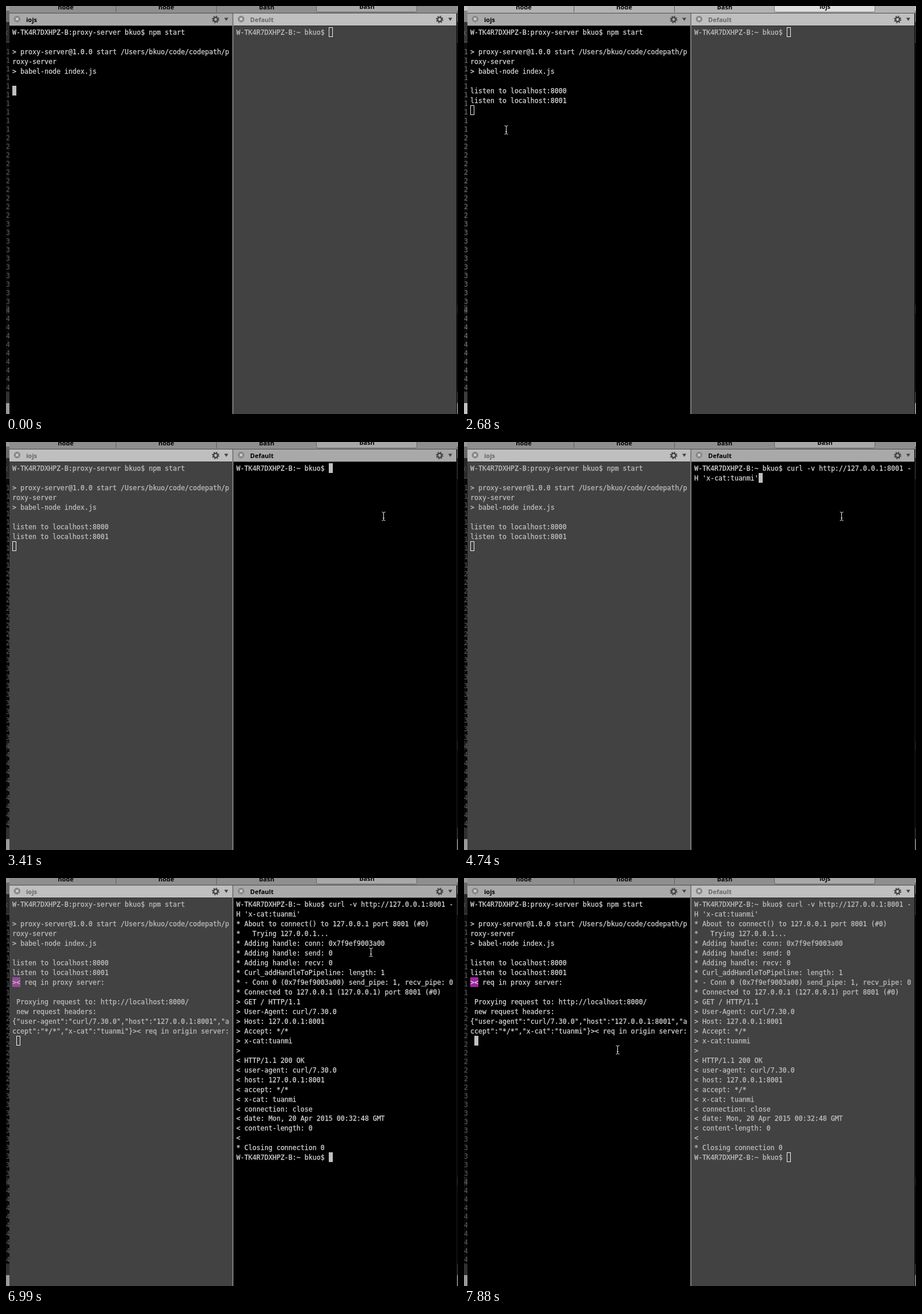
These frames come from a looping animation (787 by 711 pixels, 8000 ms). An HTML page:

```html
<!DOCTYPE html>
<html lang="en">
<head>
<meta charset="utf-8">
<title>Proxy server terminal</title>
<style>
html, body { margin: 0; width: 100%; height: 100%; overflow: hidden; background: #111; }
svg { display: block; width: 787px; height: 711px; }
text { white-space: pre; }
.gutter { font: 11.6px "DejaVu Sans Mono", monospace; fill: #888; }
.label { font: bold 11px "Open Sans", sans-serif; }
.mid { text-anchor: middle; }

.shade { opacity: .3; }
.tabs { fill: #8e8e8e; }
.front { fill: #a8a8a8; stroke: #606060; }
.away .shade { opacity: .12; }
.away .tabs { fill: #b2b2b2; }
.away .front { fill: #dedede; stroke: #777; }

.bar { fill: #bfbfbf; }
.body { fill: #424242; }
.pane .label { fill: #666; }
.term { font: 11.628px "DejaVu Sans Mono", monospace; fill: #c0c0c0; stroke: #c0c0c0; stroke-width: .25; }
.mark { fill: #964a97; stroke: none; }
.block { fill: none; stroke: #f2f2f2; stroke-width: 1; }
.on .bar { fill: #a9a9a9; }
.on .body { fill: #000; }
.on .label { fill: #000; }
.on .term { fill: #d8d8d8; stroke: #d8d8d8; }
.on .mark { fill: #a0229f; }
svg:not(.away) .on .block { fill: #c0c0c0; stroke: #c0c0c0; }
</style>
</head>
<body>
<svg id="stage" viewBox="0 0 787 711">
  <defs>
    <g id="close">
      <circle r="5.7" fill="#858585"/>
      <path d="M-2.2-2.2 2.2 2.2M2.2-2.2-2.2 2.2" stroke="#dcdcdc" stroke-width="1.6"/>
    </g>
    <g id="gear" fill="none" stroke="#444">
      <circle r="3.6" stroke-width="2.4"/>
      <circle r="5.4" stroke-width="2.2" stroke-dasharray="2.1 2.141"/>
    </g>
    <path id="ibeam" fill="none" d="M-3-7.5Q0-7.5 0-5.5Q0-7.5 3-7.5M0-6V6M-3 7.5Q0 7.5 0 5.5Q0 7.5 3 7.5M-1.5 3H1.5"/>
  </defs>

  <g id="backdrop">
    <rect width="787" height="711" fill="#0d0d0d"/>
    <rect width="787" height="8" fill="#dcdcdc"/>
    <rect y="8" width="787" height="20" fill="#999"/>
    <rect y="28" width="787" height="34" fill="#3c3c3c"/>
    <path d="M3 43 0 47 3 51" fill="none" stroke="#888"/>
    <rect y="62" width="787" height="2" fill="#555"/>
    <rect y="521" width="787" height="15" fill="#2a2a24"/>
    <rect y="672" width="787" height="20" fill="#444"/>
    <rect y="692" width="787" height="19" fill="#dcdcdc"/>
  </g>
  <rect class="shade" width="787" height="711"/>

  <rect class="tabs" x="6" width="779" height="12"/>
  <path d="M191.5 0V11M366.5 0V11" stroke="#606060"/>
  <rect x="6" y="12" width="779" height="1" fill="#4c4c4c"/>
  <rect class="front" x="540.5" y="-8" width="175" height="18.5" rx="3"/>
  <g class="label mid">
    <text x="104" y="6">node</text>
    <text x="279" y="6">node</text>
    <text x="454" y="6">bash</text>
    <text x="628.5" y="5" id="tab"></text>
  </g>

  <g id="left" class="pane"></g>
  <g id="right" class="pane"></g>
  <rect x="394" y="13" width="2" height="698" fill="#7c7c7c"/>
  <rect x="784" y="13" width="1.5" height="698" fill="#111"/>

  <g id="pointer">
    <g id="beam">
      <use href="#ibeam" stroke="#000" stroke-width="2.4" opacity=".3"/>
      <use href="#ibeam" stroke="#f0f0f0"/>
    </g>
    <path id="arrow" d="M-1-1V11L2 8.4 4 13 6 12 4 8H8Z" fill="#000" stroke="#fff" stroke-width=".9"/>
  </g>
</svg>
<script>
const LOOP = 8000, CELL = 7, ROW = 16.977;
const byId = id => document.getElementById(id);
const rowTop = row => Math.round(row * ROW);
const stage = byId('stage');

function add(parent, tag, attrs, content = '') {
  const el = document.createElementNS('http://www.w3.org/2000/svg', tag);
  for (const key in attrs) el.setAttribute(key, attrs[key]);
  el.textContent = content;
  parent.appendChild(el);
  return el;
}

// Line numbers of the editor behind the window.
for (let n = 10; n < 50; n++)
  add(byId('backdrop'), 'text', { class: 'gutter', x: 0, y: 84 + 15 * (n - 10) }, n);

const host = 'W-TK4R7DXHPZ-B', user = 'bkuo', cat = 'tuanmi';
const prompt = `${host}:~ ${user}$ `;

// Each phase adds lines from a given row and column, then leaves the cursor at [row, col].
const leftPhases = [
  { row: 0, cursor: [6, 0], lines: `${host}:proxy-server ${user}$ npm start

> proxy-server@1.0.0 start /Users/${user}/code/codepath/p
roxy-server
> babel-node index.js` },
  { row: 6, cursor: [8, 0], lines: `listen to localhost:8000
listen to localhost:8001` },
  { row: 8, cursor: [14, 1], mark: true, lines: `>< req in proxy server:

 Proxying request to: http://localhost:8000/
 new request headers:
{"user-agent":"curl/7.30.0","host":"127.0.0.1:8001","a
ccept":"*/*","x-cat":"${cat}"}>< req in origin server:` }
];

const rightPhases = [
  { row: 0, cursor: [0, 23], lines: prompt },
  { row: 0, col: 23, cursor: [1, 16], lines: `curl -v http://127.0.0.1:8001 -
H 'x-cat:${cat}'` },
  { row: 2, cursor: [26, 23], lines: `* About to connect() to 127.0.0.1 port 8001 (#0)
*   Trying 127.0.0.1...
* Adding handle: conn: 0x7f9ef9003a00
* Adding handle: send: 0
* Adding handle: recv: 0
* Curl_addHandleToPipeline: length: 1
* - Conn 0 (0x7f9ef9003a00) send_pipe: 1, recv_pipe: 0
* Connected to 127.0.0.1 (127.0.0.1) port 8001 (#0)
> GET / HTTP/1.1
> User-Agent: curl/7.30.0
> Host: 127.0.0.1:8001
> Accept: */*
> x-cat:${cat}
>
< HTTP/1.1 200 OK
< user-agent: curl/7.30.0
< host: 127.0.0.1:8001
< accept: */*
< x-cat: ${cat}
< connection: close
< date: Mon, 20 Apr 2015 00:32:48 GMT
< content-length: 0
<
* Closing connection 0
${prompt}` }
];

function makePane(id, x, title, phases) {
  const pane = byId(id);
  pane.setAttribute('transform', `translate(${x} 0)`);
  add(pane, 'rect', { class: 'body', y: 34, width: 388, height: 677 });
  add(pane, 'rect', { class: 'bar', y: 13, width: 388, height: 21 });
  add(pane, 'rect', { y: 34, width: 388, height: 1, fill: '#333' });
  add(pane, 'use', { href: '#close', x: 13.3, y: 22.7 });
  add(pane, 'text', { class: 'label', x: 29, y: 27.5 }, title);
  add(pane, 'use', { href: '#gear', x: 359, y: 23.5 });
  add(pane, 'path', { d: 'M374 20.5h7l-3.5 5.5z', fill: '#444' });

  const term = add(pane, 'g', { class: 'term', transform: 'translate(5 37)' });
  const groups = phases.map(({ row, col = 0, lines, mark }) => {
    const group = add(term, 'g', {});
    if (mark) add(group, 'rect', { class: 'mark', y: rowTop(row), width: 2 * CELL, height: 17 });
    lines.split('\n').forEach((line, i) =>
      add(group, 'text', { x: i ? 0 : col * CELL, y: rowTop(row + i) + 13 }, line));
    return group;
  });
  const block = add(term, 'rect', { class: 'block', width: CELL - 1, height: 16 });

  return (phase, focused) => {
    pane.classList.toggle('on', focused);
    groups.forEach((group, i) => group.setAttribute('display', i <= phase ? 'inline' : 'none'));
    const [row, col] = phases[phase].cursor;
    block.setAttribute('x', col * CELL + .5);
    block.setAttribute('y', rowTop(row) + .5);
  };
}

const drawLeft = makePane('left', 6, 'iojs', leftPhases);
const drawRight = makePane('right', 396, 'Default', rightPhases);

const steps = [
  [0, { tab: 'bash', away: false, focus: 'left', left: 0, right: 0, at: null, arrow: false }],
  [290, { tab: 'iojs' }],
  [440, { away: true }],
  [730, { left: 1 }],
  [2680, { at: [73.5, 216] }],
  [2830, { at: [583.5, 196] }],
  [2980, { at: [594.5, 190] }],
  [3120, { at: [672.5, 129.5] }],
  [3260, { at: [657.5, 129.5] }],
  [3410, { tab: 'bash', away: false, focus: 'right' }],
  [4450, { arrow: true }],
  [4600, { arrow: false }],
  [4740, { right: 1 }],
  [5490, { left: 2, right: 2 }],
  [6990, { at: [635.5, 129.5] }],
  [7140, { at: [469.5, 152] }],
  [7280, { at: [447.5, 155] }],
  [7430, { at: [336.5, 273] }],
  [7580, { at: [267.5, 299.5] }],
  [7880, { tab: 'iojs', focus: 'left' }]
];

const show = (id, visible) => byId(id).setAttribute('display', visible ? 'inline' : 'none');

function draw(count) {
  const s = Object.assign({}, ...steps.slice(0, count).map(step => step[1]));
  stage.classList.toggle('away', s.away);
  byId('tab').textContent = s.tab;
  drawLeft(s.left, s.focus === 'left');
  drawRight(s.right, s.focus === 'right');
  show('pointer', s.at);
  show('beam', !s.arrow);
  show('arrow', s.arrow);
  if (s.at) byId('pointer').setAttribute('transform', `translate(${s.at})`);
}

const start = performance.now();
let drawn = 0;
function tick() {
  const time = (performance.now() - start) % LOOP;
  const count = steps.filter(step => step[0] <= time).length;
  if (count !== drawn) draw(drawn = count);
  requestAnimationFrame(tick);
}
tick();
</script>
</body>
</html>
```
